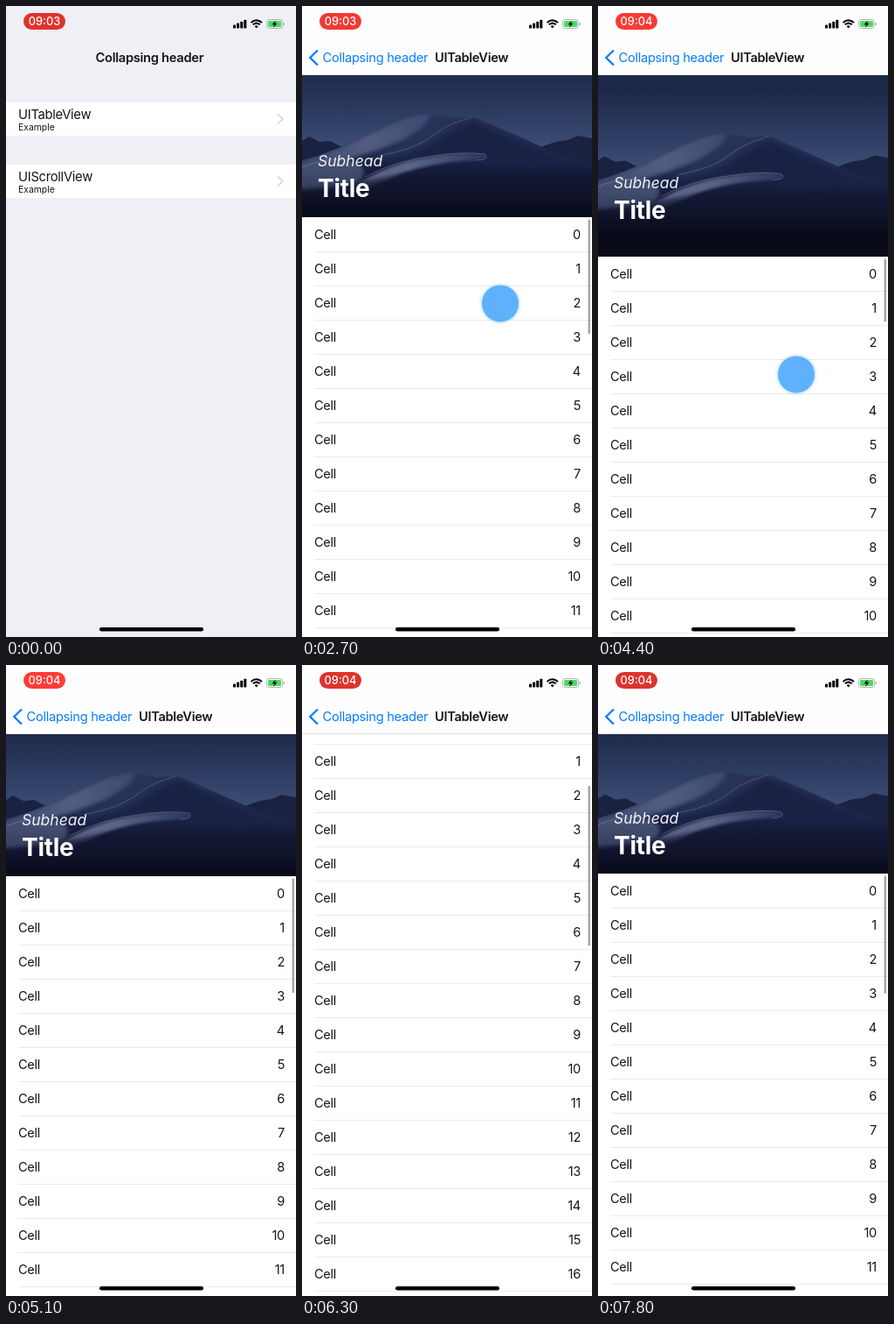
Recreate the animation shown at these times as an HTML page with a canvas. Size 332 by 720 pixels, loop 7900 ms.

```html
<!DOCTYPE html>
<html lang="en">
<head>
<meta charset="utf-8">
<title>Collapsing header</title>
<style>
html, body { margin: 0; width: 100%; height: 100%; overflow: hidden; background: #fff; }
canvas { display: block; width: 332px; height: 720px; }
</style>
</head>
<body>
<canvas id="stage"></canvas>
<script>
const W = 332, H = 720, LOOP = 7900, BAR = 78, HEAD = 160, ROW = 39;
const BLUE = '#087cff', INK = '#161616';
const canvas = document.getElementById('stage');
const dpr = window.devicePixelRatio || 1;
canvas.width = W * dpr;
canvas.height = H * dpr;
const ctx = canvas.getContext('2d');

const clamp = v => Math.max(0, Math.min(1, v));
const span = (t, a, b) => clamp((t - a) / (b - a));
const mix = (a, b, u) => a + (b - a) * u;
const smooth = u => u * u * (3 - 2 * u);
const quadIn = u => u * u;
const cubicOut = u => 1 - (1 - u) ** 3;
// Critically damped spring: share of the distance left after ms
const spring = (ms, rate) => ms <= 0 ? 1 : (1 + ms * rate / 1000) * Math.exp(-ms * rate / 1000);

function along(points, t) {
  let i = 1;
  while (i < points.length - 1 && points[i][0] < t) i++;
  const [a, b] = [points[i - 1], points[i]];
  return mix(a[1], b[1], span(t, a[0], b[0]));
}

function rect(x, y, w, h, color) {
  ctx.fillStyle = color;
  ctx.fillRect(x, y, w, h);
}

function pill(x, y, w, h, r, color) {
  ctx.beginPath();
  ctx.roundRect(x, y, w, h, r);
  ctx.fillStyle = color;
  ctx.fill();
}

function text(s, x, y, size, { color = INK, weight = 400, style = '', align = 'left', space = -0.3 } = {}) {
  ctx.font = `${style} ${weight} ${size}px Inter, "Liberation Sans", sans-serif`;
  ctx.letterSpacing = space + 'px';
  ctx.textAlign = align;
  ctx.fillStyle = color;
  ctx.fillText(s, x, y);
}

function line(path, color, width) {
  ctx.strokeStyle = color;
  ctx.lineWidth = width;
  ctx.stroke(new Path2D(path));
}

function faded(alpha, draw) {
  if (alpha <= 0) return;
  ctx.save();
  ctx.globalAlpha *= alpha;
  draw();
  ctx.restore();
}

function gradient(x0, y0, x1, y1, ...colors) {
  const g = ctx.createLinearGradient(x0, y0, x1, y1);
  colors.forEach((c, i) => g.addColorStop(i / (colors.length - 1), c));
  return g;
}

function shape(path, fill, blur = 0) {
  ctx.filter = blur ? `blur(${blur * dpr}px)` : 'none';
  ctx.fillStyle = fill;
  ctx.fill(new Path2D(path));
  ctx.filter = 'none';
}

// Night dunes on a 332 x 207 picture
function paintDunes() {
  rect(0, 0, W, 207, gradient(0, 15, 0, 115, '#1d2848', '#2c3b60', '#41517a'));
  shape('M0 98L8 93 20 99 32 98 48 106 80 112V150H0ZM332 95L316 92 304 97 290 99 265 108V150H332Z', '#1a2242');
  const dune = 'M0 120C45 108 78 88 108 76Q130 67 147 67Q164 69 172 72L196 70Q228 84 260 98Q300 117 332 124V207H0Z';
  ctx.save();
  ctx.clip(new Path2D(dune));
  shape(dune, gradient(0, 70, 0, 160, '#2f3b64', '#1d264b', '#0d1129'));
  // Lit windward side
  shape('M-9 122C45 108 78 88 108 76Q130 67 147 67Q144 84 114 98Q66 118 -9 134Z',
    gradient(0, 0, 150, 0, '#3c486c', '#525d80', '#3b476e'), 2.5);
  // Hollow between the two peaks
  shape('M149 68L194 71Q166 82 152 97Q120 116 78 118Q112 104 130 90Q150 78 149 68Z', '#283258', 2.5);
  shape('M196 72Q172 82 158 96Q138 112 116 120Q170 110 240 124L300 122Z', '#192145', 5);
  line('M196 70C176 77 164 80 150 92Q128 108 92 114', 'rgba(128,138,170,.4)', 1);
  // Wind-swept ridge
  shape('M-9 128Q28 118 56 121Q82 128 62 150Q40 166 -9 170Z',
    gradient(0, 118, 0, 165, '#4c5677', '#2c3555'), 2);
  shape('M56 152Q100 122 150 116Q190 109 211 114Q213 119 198 120Q150 122 112 136Q80 150 40 166Z',
    gradient(40, 0, 212, 0, '#626b8c', '#5a6486', '#2c365d'), 1.5);
  line('M0 128Q28 116 54 120M72 139Q108 120 152 115Q184 110 209 113Q216 119 200 120', 'rgba(146,153,181,.4)', 1);
  shape('M-9 154C60 150 112 132 168 126Q250 134 341 132V216H-9Z',
    gradient(0, 128, 0, 184, 'rgba(20,26,54,.3)', '#11152d', '#080a18'), 2);
  ctx.restore();
}

function header(h, shift) {
  if (h <= 0) return;
  ctx.save();
  ctx.beginPath();
  ctx.rect(0, BAR, W, h);
  ctx.clip();
  ctx.save();
  const k = Math.max(1, h / 207);
  ctx.translate(W / 2, BAR + h / 2);
  ctx.scale(k, k);
  ctx.translate(-W / 2, -103.5);
  paintDunes();
  ctx.restore();
  text('Subhead', 18, 181 + shift, 17.5, { color: '#f1f1f6', style: 'italic', space: 0 });
  text('Title', 18, 216 + shift, 28, { color: '#fff', weight: 700 });
  ctx.restore();
}

function table(offset, barAlpha) {
  const h = Math.max(0, HEAD + offset), top = BAR + HEAD + offset;
  rect(0, BAR, W, H - BAR, '#fff');
  for (let i = 0; i < 50; i++) {
    const y = top + i * ROW;
    if (y > H) break;
    if (y < BAR - ROW) continue;
    text('Cell', 14, y + 25, 14.6);
    text(String(i), 319, y + 25, 14.6, { align: 'right' });
    rect(14, y + ROW, W, 1, '#ebebed');
  }
  header(h, offset * 0.56);
  faded(barAlpha, () => {
    const track = BAR + h + 2.5;
    const length = 0.302 * (686 - track) - Math.max(0, offset);
    pill(327.5, track + 0.306 * Math.max(0, -offset), 2.5, Math.max(8, length), 1.25, '#a6a6a8');
  });
}

function home(highlight) {
  rect(0, 0, W, H, '#efeff6');
  [['UITableView', 110], ['UIScrollView', 181]].forEach(([name, y], i) => {
    rect(0, y, W, 38, '#fff');
    if (!i) faded(highlight, () => rect(0, y, W, 38, '#d3d3d7'));
    text(name, 14, y + 18.5, 14.8, { space: -0.3 });
    text('Example', 14, y + 32, 10.4, { space: 0 });
    line(`M311 ${y + 13.5}l6 5.5l-6 5.5`, '#d2d2d6', 1.5);
  });
}

function navBar(left) {
  const p = 1 - left, tone = (a, b) => Math.round(mix(a, b, p));
  rect(0, 0, W, BAR, `rgb(${tone(239, 254)},${tone(239, 254)},${tone(246, 254)})`);
  faded(p, () => rect(0, BAR, W, 1, '#dededf'));
  const x = mix(23.5, 102.5, left);
  faded(left, () => text('Collapsing header', x, 64, 14.7, { weight: 600 }));
  faded(p, () => {
    text('Collapsing header', x, 64, 14.7, { color: BLUE });
    text('UITableView', 152 + 200 * left, 64, 14.6, { weight: 600 });
    line('M18 50.5L9.3 59L18 67.5', BLUE, 2.3);
  });
}

function statusBar(t) {
  const glow = along([[0, 0], [400, 0], [1300, 1], [2700, 0.6], [3700, 0.6], [5100, 1], [6300, 0], [LOOP, 0]], t);
  pill(20, 8, 48, 19, 9.5, `rgb(${mix(221, 255, glow)},${mix(52, 60, glow)},${mix(45, 56, glow)})`);
  text(t < 4400 ? '09:03' : '09:04', 44, 22, 12.8, { color: '#fff', weight: 500, align: 'center', space: 0 });
  for (let i = 0; i < 4; i++) pill(260 + i * 4.1, 21.5 - i * 1.9, 3, 4 + i * 1.9, 0.8, '#000');
  line('M280.5 19Q286.7 13.4 293 19M282.8 21.3Q286.7 18 290.7 21.3', '#000', 2);
  shape('M284.6 23.1Q286.7 21.5 288.8 23.1L286.7 25.5Z', '#000');
  ctx.beginPath();
  ctx.roundRect(298.5, 15.5, 18, 10, 2.8);
  ctx.strokeStyle = '#a9abab';
  ctx.lineWidth = 0.9;
  ctx.stroke();
  pill(300, 17, 15, 7, 1.4, '#4cd964');
  pill(317.5, 19, 1.3, 3, 0.6, '#a9abab');
  shape('M308.8 16.5L304.5 21.2H307.2L306 24.7L310.5 19.8H307.8Z', '#000');
}

// Positive values pull the table down, negative ones scroll it up
function scrollAt(t) {
  if (t < 4050) return 70 * smooth(span(t, 2620, 3250)) * spring(t - 3400, 10);
  if (t < 5400) return 55 * smooth(span(t, 4050, 4500)) * spring(t - 4650, 10);
  if (t < 5750) return -110 * quadIn(span(t, 5400, 5750));
  if (t < 6600) return mix(-110, -187, cubicOut(span(t, 5750, 6150)));
  if (t < 6900) return mix(-187, -80, quadIn(span(t, 6600, 6900)));
  return mix(-80, 0, cubicOut(span(t, 6900, 7300)));
}

function touches(t, offset) {
  const rubber = offset * 1.8;
  [
    [400, 950, 130],
    [2400, 3400, 334 + rubber],
    [3980, 4650, 334 + rubber],
    [5350, 5750, 440 + offset],
    [6520, 6900, 486 + offset]
  ].forEach(([from, to, y]) => {
    faded(span(t, from - 50, from + 70) * (1 - span(t, to, to + 130)), () => {
      ctx.shadowColor = 'rgba(95,180,255,.7)';
      ctx.shadowBlur = 4 * dpr;
      ctx.beginPath();
      ctx.arc(227, y, 21, 0, Math.PI * 2);
      ctx.fillStyle = '#60b1fb';
      ctx.fill();
    });
  });
}

function draw(t) {
  const left = t > 2100 ? 0 : spring(t - 1065, 14);
  const offset = Math.round(scrollAt(t)), x = Math.round(W * left);
  ctx.setTransform(dpr, 0, 0, dpr, 0, 0);
  if (left > 0) {
    ctx.save();
    ctx.translate(-0.3 * (W - x), 0);
    home(span(t, 650, 700));
    ctx.restore();
    rect(0, BAR, W, H, `rgba(0,0,0,${0.095 * (1 - left)})`);
  }
  if (left < 1) {
    rect(x - 6, BAR, 6, H, gradient(x - 6, 0, x, 0, 'rgba(0,0,0,0)', 'rgba(0,0,0,.07)'));
    ctx.save();
    ctx.translate(x, 0);
    table(offset, span(t, 2500, 2650));
    ctx.restore();
  }
  navBar(left);
  statusBar(t);
  pill(107, 709, 119, 4.5, 2.25, '#000');
  touches(t, offset);
}

const start = performance.now();
function tick() {
  draw((performance.now() - start) % LOOP);
  requestAnimationFrame(tick);
}
tick();
</script>
</body>
</html>
```
